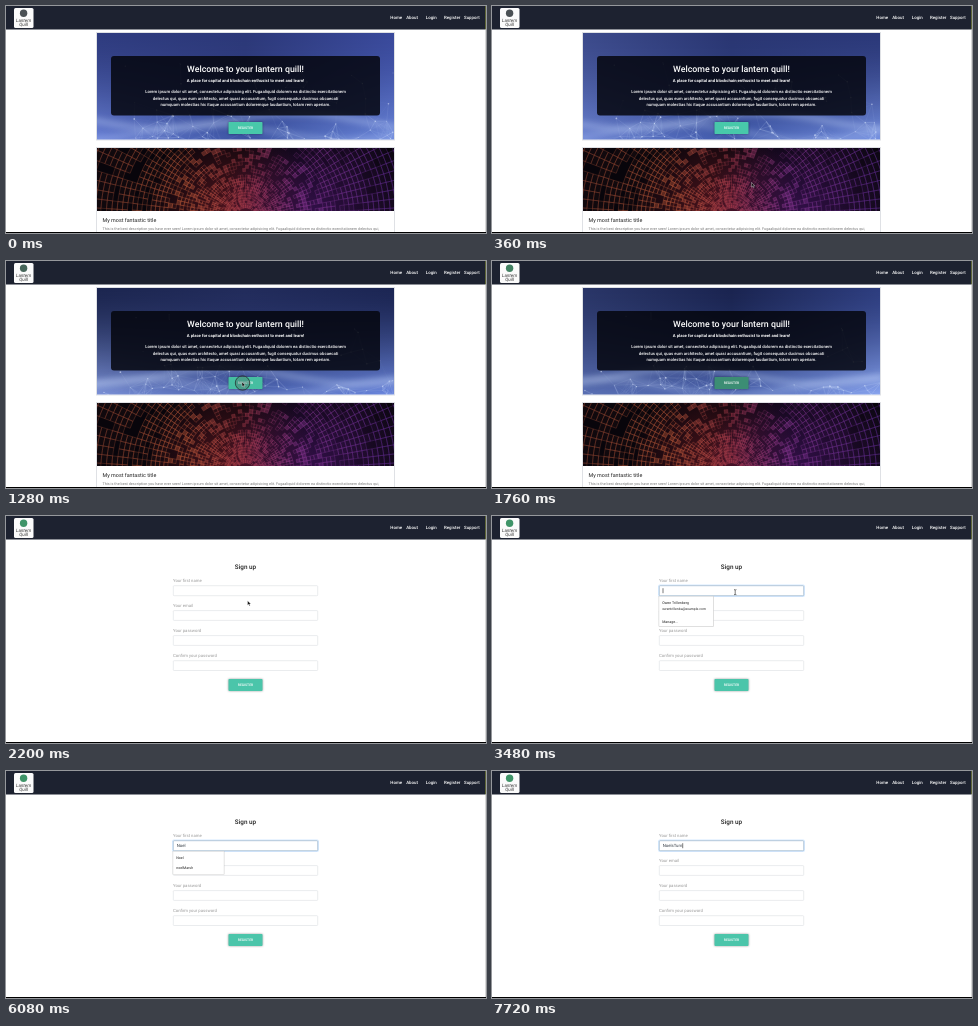
An HTML page with a canvas for the animation above (8 s loop, 480 px wide and 227 px high).

```html
<!DOCTYPE html>
<html lang="en">
<head>
<meta charset="utf-8">
<title>Sign up</title>
<style>
html, body { margin: 0; width: 100%; height: 100%; overflow: hidden; background: #fff; }
#art, #ui { position: absolute; left: 0; top: 0; width: 480px; height: 227px; display: block; }
text { font-family: Roboto, "Open Sans", sans-serif; text-rendering: geometricPrecision; white-space: pre; }
.mid { text-anchor: middle; }
.med { font-weight: 500; }
.nav { font-size: 4.4px; font-weight: 500; fill: #fff; }
.label { font-size: 4.25px; fill: #9a9a9a; }
.field { fill: #fff; stroke: #dcdfe3; stroke-width: .6; }
.popup rect { fill: #fff; stroke: #d8d8d8; stroke-width: .4; filter: drop-shadow(0 .6px .6px rgba(0,0,0,.3)); }
.popup text { font-size: 3.6px; fill: #222; }
.btn rect { filter: drop-shadow(0 .8px 1px rgba(0,0,0,.4)); }
.btn text { font-size: 3.4px; fill: #fff; }
</style>
</head>
<body>
<canvas id="art" width="480" height="227"></canvas>
<svg id="ui" viewBox="0 0 480 227">
  <rect width="480" height="23.5" fill="#1d2230"/>
  <rect x="479" width="1" height="23.5" fill="#5c6436"/>
  <rect x="479" y="23.5" width="1" height="203" fill="#d9d9d9"/>
  <rect x="8" y="2" width="19.5" height="20" rx="1.5" fill="#fbfbfb"/>
  <circle id="mark" cx="17.6" cy="7.2" r="3.7"/>
  <g font-size="4.6" fill="#333" font-style="italic" class="mid">
    <text x="17.6" y="15.6">Lantern</text>
    <text x="17.6" y="20.2">Quill</text>
  </g>
  <g class="nav">
    <text x="384.3" y="13.2">Home</text>
    <text x="400.2" y="13.2">About</text>
    <text x="419.8" y="13.2">Login</text>
    <text x="438" y="13.2">Register</text>
    <text x="458" y="13.2">Support</text>
  </g>

  <g id="home">
    <rect x="105" y="50" width="269" height="59.5" rx="3" fill="#04050d" opacity=".84"/>
    <g class="mid med" fill="#fff">
      <text x="239.5" y="65.6" font-size="8.8">Welcome to your lantern quill!</text>
      <text x="239.5" y="75.6" font-size="4.2" font-weight="700">A place for capital and blockchain enthusist to meet and learn!</text>
      <g font-size="4.25">
        <text x="239.5" y="87.2">Lorem ipsum dolor sit amet, consectetur adipisicing elit. Fugaaliquid dolorem ea distinctio exercitationem</text>
        <text x="239.5" y="93.6">delectus qui, quas eum architecto, amet quasi accusantium, fugit consequatur ducimus obcaecati</text>
        <text x="239.5" y="100">numquam molestias hic itaque accusantium doloremque laudantium, totam rem aperiam.</text>
      </g>
    </g>
    <g class="btn mid med">
      <rect id="heroBtn" x="222.5" y="116" width="34" height="12" rx=".8"/>
      <text x="239.5" y="123.3">REGISTER</text>
    </g>
    <text x="96.5" y="216" font-size="5.4" fill="#222">My most fantastic title</text>
    <text x="96.5" y="224.3" font-size="3.75" fill="#777">This is the best description you have ever seen! Lorem ipsum dolor sit amet, consectetur adipisicing elit. Fugaaliquid dolorem ea distinctio exercitationem delectus qui,</text>
  </g>

  <g id="signup">
    <text class="mid med" x="239.5" y="53.2" font-size="6.35" fill="#222">Sign up</text>
    <g class="label">
      <text x="167" y="65.6">Your first name</text>
      <text x="167" y="90.8">Your email</text>
      <text x="167" y="115.6">Your password</text>
      <text x="167" y="140.7">Confirm your password</text>
    </g>
    <rect id="glow" x="166.6" y="69" width="145.8" height="11.4" rx="1.2" fill="none" stroke="#80bdff" stroke-width="1.1"/>
    <rect id="first" class="field" x="167.3" y="69.7" width="144.4" height="10" rx=".8"/>
    <rect class="field" x="167.3" y="94.6" width="144.4" height="9.8" rx=".8"/>
    <rect class="field" x="167.3" y="119.6" width="144.4" height="9.8" rx=".8"/>
    <rect class="field" x="167.3" y="144.7" width="144.4" height="9.8" rx=".8"/>
    <text id="typed" x="170.7" y="76.2" font-size="4.3" fill="#333b44"></text>
    <rect id="caret" y="72.2" width=".6" height="5" fill="#222"/>
    <g class="btn mid med">
      <rect x="222.5" y="163" width="34" height="12" rx=".8" fill="#4bc5aa"/>
      <text x="239.5" y="170.2">REGISTER</text>
    </g>
    <g id="people" class="popup">
      <rect x="167" y="80.2" width="54.5" height="30.3"/>
      <text x="170.2" y="88.2">Owen Trillenberg</text>
      <text x="170.2" y="93.8" style="font-size:3.4px">owentrillenba@example.com</text>
      <text x="170.2" y="106.6">Manage...</text>
    </g>
    <g id="matches" class="popup">
      <rect x="167" y="80.2" width="51" height="23.6"/>
      <text x="170.2" y="88.2">Noel</text>
      <text x="170.2" y="97.8">noelMarsh</text>
    </g>
  </g>

  <circle id="ring" cx="236.5" cy="122" r="7.2" fill="#555" fill-opacity=".3" stroke="#26332f" stroke-width=".8"/>
  <path id="arrow" d="M0 0V4.6L1.1 3.6L1.9 5.3L2.6 5L1.9 3.3H3.3Z" fill="#111" stroke="#fff" stroke-width=".35"/>
  <path id="beam" d="M242 73.6Q243.2 73.6 243.2 74.3V78Q243.2 78.7 242 78.7M244.4 73.6Q243.2 73.6 243.2 74.3M243.2 78Q243.2 78.7 244.4 78.7" fill="none" stroke="#222" stroke-width=".6"/>
  <rect y="226" width="480" height="1" fill="#000"/>
</svg>
<script>
const LOOP = 8000, PAGE = 2000, FOCUS = 2560;
const $ = id => document.getElementById(id);
const ctx = $('art').getContext('2d');
const HERO = { x: 91, y: 27, w: 297, h: 106.5 };
const CARD = { x: 91, y: 142, w: 297, h: 63 };

// three top and three bottom tones of the hero at each time
const TONES = [
  [0, '2f3c80 2c3878 3a4a9c 6a82d8 3c54a4 6c88dc'],
  [720, '4a5a98 27346c 1d2858 6c84d0 4560b4 7c98e8'],
  [1280, '1c2650 222c5c 1c2654 7c92d8 4a62b0 6c88e0'],
  [1760, '2a3668 1a2450 2e3e80 5a70b4 4c64b0 88a4f0']
].map(([t, s]) => [t, s.split(' ').map(rgb).flat()]);
const POINTER = [[0, [290, 240]], [660, [236.5, 128.5]], [960, [236.5, 128.5]], [1160, [236, 121]],
  [PAGE, [236, 121]], [2240, [242, 82]], [2440, [243, 75]]];
const KEYS = [[4000, 1], [4360, 2], [5480, 3], [5560, 4], [6640, 5], [7200, 6], [7360, 7], [7520, 8], [7680, 9]];
const NAME = 'NoelsTurn';

function rgb(hex) { return [0, 2, 4].map(i => parseInt(hex.substr(i, 2), 16)); }
const css = c => `rgb(${c.map(Math.round)})`;
const clamp = v => Math.max(0, Math.min(1, v));
const mix = (a, b, k) => a.map((v, i) => v + (b[i] - v) * k);
const smooth = k => k * k * (3 - 2 * k);
const show = (id, on) => { $(id).style.display = on ? '' : 'none'; };

function along(table, t) {
  const i = table.findIndex(row => row[0] > t);
  if (i < 0) return table[table.length - 1][1];
  if (!i) return table[0][1];
  const [a, from] = table[i - 1], [b, to] = table[i];
  return mix(from, to, smooth((t - a) / (b - a)));
}

function random(seed) {
  return () => {
    seed = (seed * 1664525 + 1013904223) % 4294967296;
    return seed / 4294967296;
  };
}

// the web of light gathers along the lower edge
const rnd = random(11);
const nodes = Array.from({ length: 95 }, () => ({
  x: rnd() * HERO.w, y: HERO.h * (1.03 - .75 * rnd() ** 2.2),
  vx: (rnd() - .5) * 24, vy: (rnd() - .5) * 10, r: .3 + rnd() * .6
}));

function drawHero(t) {
  const { x, y, w, h } = HERO, s = t / 1000;
  const tones = along(TONES, t);
  ctx.save();
  ctx.beginPath();
  ctx.rect(x, y, w, h);
  ctx.clip();
  ctx.translate(x, y);

  for (let row = 0; row < h; row++) {
    const line = mix(tones.slice(0, 9), tones.slice(9), (row / h) ** 1.6);
    const shade = ctx.createLinearGradient(0, 0, w, 0);
    for (let i = 0; i < 3; i++) shade.addColorStop(i / 2, css(line.slice(i * 3, i * 3 + 3)));
    ctx.fillStyle = shade;
    ctx.fillRect(0, row, w, 1);
  }

  // drifting bands of light
  ctx.filter = 'blur(3px)';
  for (let k = 0; k < 2; k++) {
    ctx.beginPath();
    for (let px = -10; px <= w + 10; px += 10)
      ctx.lineTo(px, 88 + 11 * k + 8 * Math.sin(px / 42 + k * 2 + s * 1.3));
    ctx.strokeStyle = `rgba(205,222,255,${.4 - k * .1})`;
    ctx.lineWidth = 5;
    ctx.stroke();
  }
  ctx.filter = 'none';

  const pts = nodes.map(n => [n.x + n.vx * s, n.y + n.vy * s, n.r]);
  ctx.lineWidth = .5;
  pts.forEach(([ax, ay, r], i) => {
    for (const [bx, by] of pts.slice(i + 1)) {
      const d = Math.hypot(ax - bx, ay - by);
      if (d > 25) continue;
      ctx.strokeStyle = `rgba(210,225,255,${.5 * (1 - d / 25)})`;
      ctx.beginPath();
      ctx.moveTo(ax, ay);
      ctx.lineTo(bx, by);
      ctx.stroke();
    }
    ctx.fillStyle = 'rgba(225,236,255,.55)';
    ctx.beginPath();
    ctx.arc(ax, ay, r, 0, 7);
    ctx.fill();
  });
  ctx.restore();
}

// broken warped grid fanning out from below the middle
function paintCard() {
  const c = document.createElement('canvas');
  const w = c.width = CARD.w, h = c.height = CARD.h;
  const g = c.getContext('2d'), pick = random(5), sectors = 104;
  const cx = w / 2, cy = h + 6;
  const glow = (x, y, r, color) => {
    const shade = g.createRadialGradient(x, y, 2, x, y, r);
    shade.addColorStop(0, `rgba(${color},.6)`);
    shade.addColorStop(1, `rgba(${color},0)`);
    g.fillStyle = shade;
    g.fillRect(0, 0, w, h);
  };
  g.fillStyle = '#08050b';
  g.fillRect(0, 0, w, h);
  glow(cx - 15, h, 85, '125,30,40');
  glow(cx + 70, h, 95, '75,22,110');

  const hue = g.createLinearGradient(0, 0, w, 0);
  [[0, '#8c4230'], [.3, '#c05a38'], [.5, '#a83a4c'], [.68, '#87358f'], [1, '#5f2a94']]
    .forEach(([k, col]) => hue.addColorStop(k, col));
  g.strokeStyle = g.fillStyle = hue;
  g.lineWidth = .5;
  for (let r = 9, step; r < 175; r += step) {
    step = 2.2 + r * .024;
    for (let i = 0; i < sectors; i++) {
      const p = pick(), a = i / sectors * 2 * Math.PI, b = a + 2 * Math.PI / sectors;
      const top = Math.abs(Math.cos(a)) < .65 && r > 36;
      if (p < (top ? .6 : r < 80 ? .4 : .22)) continue;
      g.beginPath();
      g.arc(cx, cy, r, a, b);
      g.arc(cx, cy, r + step, b, a, true);
      g.closePath();
      g.globalAlpha = r < 75 && p > .85 ? .4 : .06;
      g.fill();
      g.globalAlpha = top ? .45 : .65;
      g.stroke();
    }
  }
  return c;
}
const card = paintCard();

function frame(box, height) {
  ctx.strokeStyle = '#dfe1e5';
  ctx.lineWidth = 1;
  ctx.strokeRect(box.x - .5, box.y - .5, box.w + 1, height + 1);
}

function drawHome(t) {
  frame(HERO, HERO.h);
  frame(CARD, 100);
  drawHero(t);
  ctx.drawImage(card, CARD.x, CARD.y);
  const press = clamp((t - 1200) / 500);
  $('heroBtn').setAttribute('fill', css(mix(rgb('48c8aa'), rgb('3c8d74'), press)));
}

function drawSignup(t) {
  const focus = smooth(clamp((t - 2440) / 160));
  $('glow').style.opacity = focus * .32;
  $('first').style.stroke = css(mix(rgb('dcdfe3'), rgb('86a6c2'), focus));
  const past = KEYS.filter(k => k[0] <= t);
  const [last, count] = past.length ? past[past.length - 1] : [FOCUS, 0];
  const typed = $('typed');
  typed.textContent = NAME.slice(0, count);
  $('caret').setAttribute('x', 170.7 + (count ? typed.getComputedTextLength() + .2 : 0));
  show('caret', t >= FOCUS && (t - last) % 920 < 440);
  show('people', t >= 2640 && t < 4080);
  show('matches', t >= 4080 && t < 6640);
}

function render(t) {
  const home = t < PAGE;
  ctx.clearRect(0, 0, 480, 227);
  show('home', home);
  show('signup', !home);
  if (home) drawHome(t); else drawSignup(t);
  $('mark').setAttribute('fill', css(mix(rgb('4a5054'), rgb('3f9468'), clamp((t - 900) / 1200))));
  const [px, py] = along(POINTER, t);
  $('arrow').setAttribute('transform', `translate(${px} ${py})`);
  show('arrow', t < 1520 || (t >= PAGE && t < 2400));
  show('beam', t >= 2400 && t < 4000);
  show('ring', t >= 1160 && t < 1520);
  $('ring').style.opacity = clamp((1520 - t) / 160);
}

const start = performance.now();
function tick() {
  render((performance.now() - start) % LOOP);
  requestAnimationFrame(tick);
}
tick();
</script>
</body>
</html>
```
